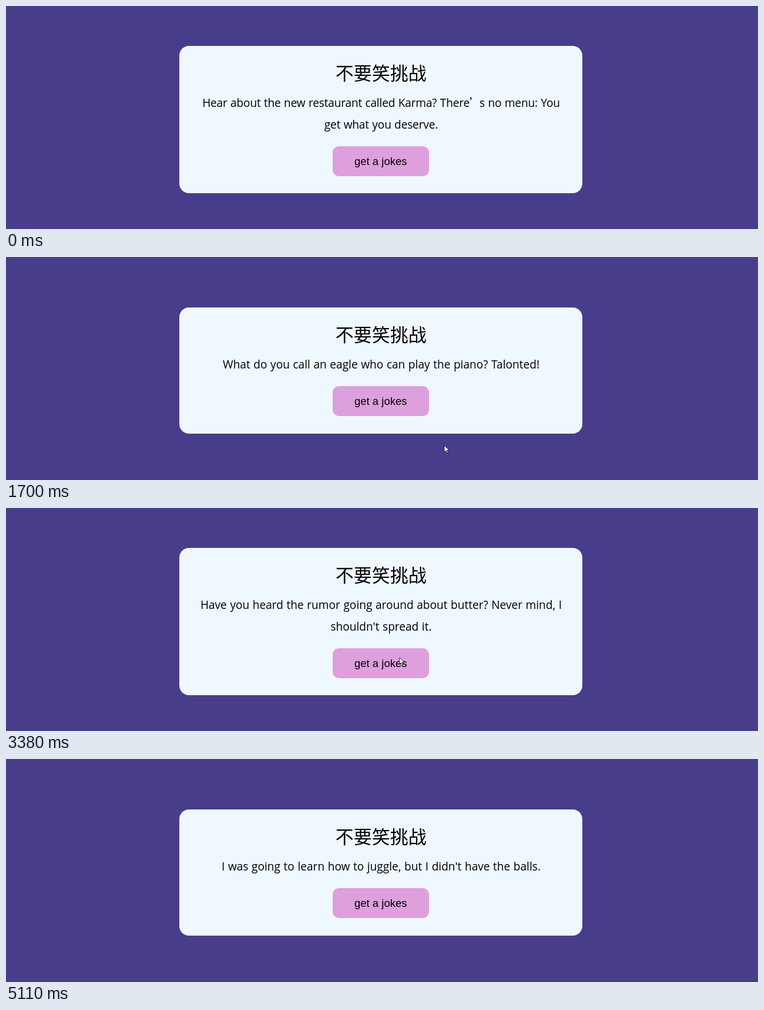
An HTML page that plays this animation: 1280 by 380 pixels, repeating every 5680 ms.

```html
<!DOCTYPE html>
<html lang="zh-CN">
<head>
<meta charset="utf-8">
<title>不要笑挑战</title>
<style>
  html, body { margin: 0; width: 100%; height: 100%; overflow: hidden; background: #483d8b; }
  #stage { position: relative; width: 1280px; height: 380px; overflow: hidden; color: #000; }
  .card {
    position: absolute; left: 295.4px; width: 685.6px; bottom: 79.2px; height: 214.6px;
    border-radius: 16.5px; background: #eff7ff; text-align: center; white-space: nowrap;
  }
  .card.tall { bottom: 60.6px; height: 251.6px; }
  .title, .line { position: absolute; left: 0; right: 0; }
  .title {
    top: 25px; font: 350 31px/40px "Noto Sans CJK SC", "Noto Sans CJK JP", sans-serif;
  }
  .line {
    left: .6px; font: 19.08px/37px "Open Sans", "Noto Sans", sans-serif; word-spacing: .63px;
  }
  .quote {
    display: inline-block; width: 17px; text-align: left; letter-spacing: 0;
    font: 19px/19px "Noto Sans CJK SC", "Noto Sans CJK JP", sans-serif;
  }
  .button {
    position: absolute; left: 261.1px; width: 163.5px; height: 51.4px; bottom: 29.2px;
    border-radius: 11px; background: #dda0dd;
    font: 18.5px/51.4px "Liberation Sans", Arial, sans-serif;
  }
  #cursor { position: absolute; left: 0; top: 0; }
  #cursor svg { position: absolute; left: 0; top: 0; overflow: visible; }
  #glow {
    position: absolute; left: -10px; top: -10.5px; width: 23px; height: 23px;
    border-radius: 50%; background: rgba(255, 224, 60, .7);
  }
</style>
</head>
<body>
<div id="stage">
  <div id="cursor">
    <svg width="12" height="16">
      <path d="M0 0V11.4L2.6 9L4.6 13.4L6.4 12.6L4.5 8.4H8.2Z"
            fill="#fff" stroke="#111" stroke-width=".9" stroke-linejoin="round"/>
    </svg>
    <div id="glow"></div>
  </div>
</div>
<script>
const LOOP = 5680, HOLD = 130, REPLY = 330;
const stage = document.getElementById('stage');
const cursor = document.getElementById('cursor');
const glow = document.getElementById('glow');

const jokes = [
  { start: 0, spacing: -.16, lines: [
    'Hear about the new restaurant called Karma? There’s no menu: You', 'get what you deserve.'] },
  { start: 1460, lines: ['What do you call an eagle who can play the piano? Talonted!'] },
  { start: 3070, lines: [
    'Have you heard the rumor going around about butter? Never mind, I', "shouldn't spread it."] },
  { start: 4050, lines: ['Can I watch the TV? Dad: Yes, but don’t turn it on.'] },
  { start: 4930, lines: ["I was going to learn how to juggle, but I didn't have the balls."] },
];

// every new joke answers a press released shortly before
const presses = jokes.slice(1).map(({ start }) => [start - REPLY - HOLD, start - REPLY]);

const entry = { x: 1064, y: 372 };
const moves = [
  { from: 320, to: 770, x: 601, y: 232, ease: 'ease-out' },
  { from: 770, to: 980, x: 619.5, y: 257.5, ease: 'ease-in-out' },
  { from: 1130, to: 1700, x: 746, y: 321, ease: 'cubic-bezier(.1, .5, .4, 1)' },
  { from: 1980, to: 2230, x: 669.7, y: 254.7, ease: 'ease-in-out' },
  { from: 3380, to: 3410, x: 671.7, y: 254.5, ease: 'linear' },
  { from: 4350, to: 4440, x: 674, y: 254, ease: 'linear' },
  { from: 4640, to: 5110, x: 1160, y: 378, ease: 'cubic-bezier(.6, 0, .9, .5)' },
];

const play = (el, frames) => el.animate(frames, { duration: LOOP, iterations: Infinity });

function toggle(el, spans, on, off) {
  const frame = (t, style) => ({ ...style, offset: t / LOOP, easing: 'step-end' });
  play(el, [
    frame(0, off),
    ...spans.flatMap(([from, to]) => [frame(from, on), frame(to, off)]),
    frame(LOOP, off),
  ]);
}

function travel(el, { x, y }, list) {
  const frame = (t, easing) => ({ offset: t / LOOP, easing, transform: `translate(${x}px, ${y}px)` });
  const frames = [frame(0, 'linear')];
  for (const move of list) {
    frames.push(frame(move.from, move.ease));
    ({ x, y } = move);
    frames.push(frame(move.to, 'linear'));
  }
  play(el, [...frames, frame(LOOP, 'linear')]);
}

function add(parent, name, html = '') {
  const el = document.createElement('div');
  el.className = name;
  el.innerHTML = html;
  parent.append(el);
  return el;
}

const shown = { visibility: 'visible' }, hidden = { visibility: 'hidden' };

jokes.forEach(({ start, lines, spacing = 0 }, i) => {
  const card = add(stage, lines.length > 1 ? 'card tall' : 'card');
  add(card, 'title', '不要笑挑战');
  lines.forEach((text, row) => {
    const line = add(card, 'line', text.replace('’', '<span class="quote">’</span>'));
    line.style.top = 79 + row * 37 + 'px';
    line.style.letterSpacing = spacing + 'px';
  });
  toggle(add(card, 'button', 'get a jokes'), presses,
    { transform: 'scale(.982)', backgroundColor: '#e3b9e7' },
    { transform: 'none', backgroundColor: '#dda0dd' });
  const next = jokes[i + 1];
  toggle(card, [[start, next ? next.start : LOOP]], shown, hidden);
});

stage.append(cursor);
toggle(cursor, [[moves[0].from, moves[moves.length - 1].to]], shown, hidden);
toggle(glow, presses, { opacity: 1 }, { opacity: 0 });
travel(cursor, entry, moves);
</script>
</body>
</html>
```
